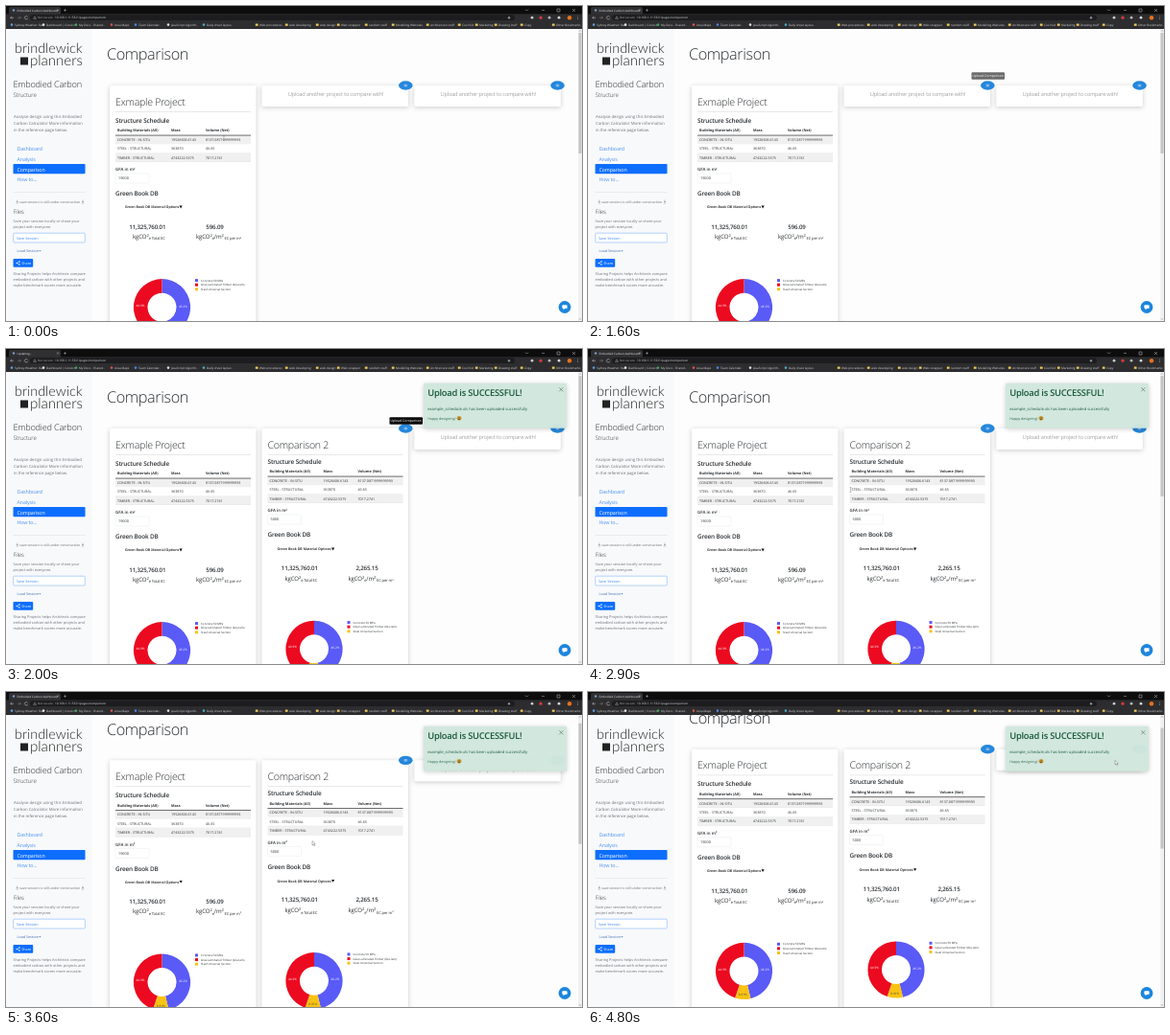
An HTML page for the animation above (4900 ms loop, 600 px wide and 329 px high).

```html
<!DOCTYPE html>
<html lang="en">
<head>
<meta charset="utf-8">
<title>Embodied Carbon dashboard</title>
<style>
  html, body { margin: 0; width: 100%; height: 100%; overflow: hidden; background: #fff; }
  svg { display: block; width: 100vw; height: 100vh; }
  text { font-family: "Open Sans", "Noto Sans", sans-serif; white-space: pre; text-rendering: geometricPrecision; }
  .brand { font-family: Lato, "Open Sans", sans-serif; font-weight: 300; }
  .shadow { filter: drop-shadow(0 1.5px 2.5px rgba(0, 0, 0, .2)); }
</style>
</head>
<body>
<svg id="stage" viewBox="0 0 600 329" preserveAspectRatio="none"></svg>
<script>
const LOOP = 4900, STEP = 100, SCROLL = 23.3;
const BLUE = '#0d6efd', INK = '#2b2f33', GREY = '#6c7075';
const PIE = ['#5a5af6', '#f9c313', '#ec0a20'];

// Markup helpers; text is placed by the middle of its capitals, larger text is set a little tighter.
const text = (x, y, s, size, fill = INK, more = '') =>
  `<text x="${x}" y="${(y + size * .36).toFixed(2)}" font-size="${size}" fill="${fill}" letter-spacing="${size > 5 ? -.025 * size : 0}" ${more}>${s}</text>`;
const rect = (x, y, w, h, fill, more = '') =>
  `<rect x="${x}" y="${y}" width="${w}" height="${h}" fill="${fill}" ${more}/>`;
const dot = (x, y, r, fill) => `<circle cx="${x}" cy="${y}" r="${r}" fill="${fill}"/>`;
const path = (d, stroke, width = .6, fill = 'none') =>
  `<path d="${d}" stroke="${stroke}" stroke-width="${width}" fill="${fill}"/>`;
const group = (id, body) => `<g id="${id}">${body}</g>`;
const lines = (x, y, gap, list, size, fill) =>
  list.map((s, i) => text(x, y + i * gap, s, size, fill)).join('');
const raised = (s, size, shift) =>
  `<tspan dy="${-shift}" font-size="${size}">${s}</tspan><tspan dy="${shift}">\u200b</tspan>`;
const BOLD = 'font-weight="600" ', LIGHT = 'font-weight="300" ', MID = 'text-anchor="middle"';

function donut(cx, cy) {
  const shares = [.462, .089, .449], R = 29.6, r = 15;
  const at = (turn, rad) => {
    const a = turn * 2 * Math.PI;
    return (cx + rad * Math.sin(a)).toFixed(2) + ' ' + (cy - rad * Math.cos(a)).toFixed(2);
  };
  let from = 0, out = '';
  shares.forEach((share, i) => {
    const to = from + share;
    out += `<path fill="${PIE[i]}" d="M${at(from, R)}A${R} ${R} 0 0 1 ${at(to, R)}L${at(to, r)}A${r} ${r} 0 0 0 ${at(from, r)}Z"/>`;
    from = to;
  });
  return out + text(cx + 22, cy - 1.3, '46.2%', 3.2, '#fff', MID)
    + text(cx - 22.5, cy - 2, '44.9%', 3.2, '#fff', MID)
    + text(cx - 1.3, cy + 24.6, '8.91%', 3.1, '#444', MID);
}

function table(x, y) {
  const rows = [
    ['CONCRETE - IN-SITU', '19526606.6143', '8137.0871999999993'],
    ['STEEL - STRUCTURAL', '363870', '46.65'],
    ['TIMBER - STRUCTURAL', '4743222.5375', '7017.2741']
  ];
  const cols = [2, 58, 94], pitch = 9.3;
  const row = (cells, cy, size, more) =>
    cells.map((s, i) => text(x + cols[i], cy, s, size, INK, more)).join('');
  let out = row(['Building Materials (All)', 'Mass', 'Volume (Net)'], y, 3.75, 'font-weight="700"');
  rows.forEach((cells, i) => {
    const top = y + 5 + i * pitch;
    out += rect(x, top, 141, pitch, i % 2 ? '#fff' : '#f0f0f0')
      + rect(x, top + pitch - .2, 141, .3, '#d9dbde') + row(cells, top + 4.6, 3.65);
  });
  return out + rect(x, y + 4.7, 141, .7, '#333');
}

function projectCard(x, title, lift, area, perArea) {
  const left = x + 6, unit = 6.1;
  const legend = ['Concrete 50 MPa', 'Glue Laminated Timber (Glu-lam)', 'Steel Universal Section'];
  const colours = [PIE[0], PIE[2], PIE[1]];
  return rect(x, 83, 152.5, 300, '#fff', 'rx="1.5" class="shadow"')
    + text(left, 99.7, title, 10.6, INK, LIGHT)
    + rect(left, 110, 141, .5, '#cfd1d4')
    + text(left, 119.3 - lift, 'Structure Schedule', 6.45, INK, BOLD)
    + table(left, 130 - lift)
    + text(left, 170.7 - lift, 'GFA in m' + raised('2', 3, 1.5), 4.4, INK, BOLD)
    + rect(left, 175 - lift, 35, 10, '#fff', 'rx="1" stroke="#e6e8ea" stroke-width=".5"')
    + text(left + 3, 180 - lift, area, 3.8)
    + text(left, 196 - lift, 'Green Book DB', 6.4, INK, BOLD)
    + text(left + 10, 210 - lift / 2, 'Green Book DB Material Options', 3.6, '#111', BOLD)
    + `<path d="M${left + 66.5} ${208.6 - lift / 2}h3.2l-1.6 2.8z" fill="#111"/>`
    + text(x + 39.3, 230.8 - lift, '11,325,760.01', 6.15, INK, BOLD + MID)
    + text(x + 109.5, 230.8 - lift, perArea, 6.15, INK, BOLD + MID)
    + text(x + 24, 240.7 - lift / 2, 'kgCO' + raised('2', 4.2, 2) + '<tspan dy="1.4" font-size="4.1">e Total EC</tspan>', unit)
    + text(x + 90, 240.7 - lift / 2, 'kgCO' + raised('2', 4.2, 2) + '<tspan dy="1.4" font-size="4.1">e</tspan><tspan dy="-1.4">/m</tspan>'
      + raised('2', 4.2, 2) + '<tspan dy="1.4" font-size="4.1"> EC per m</tspan>' + raised('2', 2.7, 1.2), unit)
    + donut(x + 54.5, 314.7 - lift * .7)
    + legend.map((s, i) => {
      const y = 286.6 + i * 4.6 - lift / 2;
      return rect(x + 89, y - 1.5, 3, 3, colours[i]) + text(x + 95, y, s, 2.95);
    }).join('');
}

const emptyCard = x => rect(x, 83, 152.5, 22, '#fff', 'rx="1.5" class="shadow"')
  + text(x + 77, 92.3, 'Upload another project to compare with!', 5.75, GREY, LIGHT + MID);

const pill = x => `<ellipse cx="${x}" cy="83" rx="7.3" ry="4.7" fill="#2587dc"/>`
  + `<ellipse cx="${x}" cy="83" rx="1.7" ry="1" fill="none" stroke="#fff" stroke-width=".4"/>` + dot(x, 83, .5, '#fff');

function sidebar() {
  const nav = ['Dashboard', 'Analysis', 'Comparison', 'How to...'];
  const arrow = x => path(`M${x} 202.6v2.4m-1-1l1 1l1-1M${x - 1.2} 206h2.4`, '#777', .45);
  return rect(0, 24, 89.5, 305, '#f8f9fa')
    + `<text x="9" y="49" font-size="14.4" fill="#222" class="brand">brindlewick</text>`
    + `<text x="25" y="62" font-size="15" fill="#222" class="brand">planners</text>`
    + rect(15, 53.5, 8, 8, '#222')
    + text(7.5, 81.3, 'Embodied Carbon', 9.2, INK, LIGHT)
    + text(7.5, 92.7, 'Structure', 6.1, INK, LIGHT)
    + lines(8, 115, 7, ['Analyse design using this Embodied', 'Carbon Calculator More information', 'in the reference page below.'], 4.25, GREY)
    + rect(7.5, 165, 75, 10.3, BLUE, 'rx=".8"')
    + nav.map((s, i) => text(11.5, 149.4 + i * 10.6, s, 5.35, i === 2 ? '#fff' : '#4a92f7')).join('')
    + rect(7.5, 194, 75, .4, '#cfd2d5')
    + arrow(11.7) + text(14, 204.5, 'save session is still under construction', 3.55, GREY) + arrow(80)
    + text(7.5, 215.3, 'Files', 6, INK, LIGHT)
    + lines(7.5, 225, 6, ['Save your session locally or share your', 'project with everyone.'], 3.85, GREY)
    + rect(7.7, 237.2, 74.6, 9.8, '#fff', 'rx="1" stroke="#69a6fb" stroke-width=".5"')
    + text(11, 242.2, 'Save Session', 3.8, '#3b85f0')
    + text(11.5, 255.8, 'Load Session', 3.7, '#3d6db5')
    + `<path d="M34.3 255.2h2.2l-1.1 1.4z" fill="#3d6db5"/>`
    + rect(7.5, 264, 20.7, 8.8, BLUE, 'rx="1"')
    + path('M14 267l-2.6 1.5l2.6 1.5', '#fff', .5) + dot(14, 267, .7, '#fff') + dot(11.2, 268.5, .7, '#fff') + dot(14, 270, .7, '#fff')
    + text(16.3, 268.5, 'Share', 3.7, '#fff')
    + lines(7.5, 280, 6, ['Sharing Projects helps Architects compare', 'embodied carbon with other projects and', 'make benchmark scores more accurate.'], 3.85, GREY);
}

function browser() {
  const marks = [
    [9, 'Sydney Weather: Ra..', '#5b9de0'], [42, 'Dashboard | Convict..', '#e8e8e8'], [76, 'My Docs - Shared..', '#3da35d'],
    [113, 'Area Maps', '#d9534f'], [138, 'Team Calendar..', '#4a86e8'], [172, 'JavaScript Algorith..', '#ddd'], [209, 'Daily sheet layout..', '#48a9c5'],
    [264, 'Web procedures'], [295, 'web developing'], [327, 'web design'], [349, 'Web scrapper'], [378, 'random stuff'],
    [406, 'Modelling Websites'], [442, 'Architecture stuff'], [475, 'Cool Vid'], [493, 'Marketing'], [513, 'Drawing stuff'],
    [540, 'Copy'], [573, 'Other Bookmarks']
  ];
  const pale = '#d4d5d8';
  return rect(0, 0, 600, 9, '#0d0d0e') + rect(3, 1, 54, 8, '#303032', 'rx="1.5"')
    + rect(0, 8.3, 600, 15.7, '#2d2d2f') + rect(25, 9.3, 505, 5.8, '#1d1d1f', 'rx="2.9"')
    + dot(8, 4.4, 1.2, '#7d9fd0')
    + `<text id="tab" x="11.5" y="5.5" font-size="3.1" fill="#e4e5e7"></text>`
    + path('M53 3.4l2 2m0-2l-2 2M60 4.4h3M61.5 2.9v3', pale, .4)
    + path('M541 3.5l1.5 1.5l1.5-1.5M558 4.4h3M574 3h3v3h-3zM590 3l3 3m0-3l-3 3', pale, .45)
    + path('M8 12.2H4.6l1.4-1.4m-1.4 1.4l1.4 1.4', pale, .5) + path('M12 12.2h3.4l-1.4-1.4m1.4 1.4l-1.4 1.4', '#888', .5)
    + path('M22.5 11.3a1.7 1.7 0 1 0 .2 1.5', pale, .5)
    + path('M30 10.8l1.5 2.6h-3z', '#c9cacd', .4)
    + text(33, 12.2, 'Not secure', 3.1, '#aaacb0') + text(51, 12.2, '10.168.1.11:5321/pages/comparison', 3.15, pale)
    + dot(524, 12.2, 1.2, '#8b8d91') + dot(548, 12.2, 1.4, '#c8c9cc') + dot(557, 12.2, 1.6, '#d93b3b')
    + dot(566, 12.2, 1.4, '#b5b7ba') + dot(576, 12.2, 1.4, '#d5d6d8') + dot(587, 12.2, 2.2, '#e8711a')
    + [10.8, 12.2, 13.6].map(y => dot(595.5, y, .4, pale)).join('')
    + marks.map(([x, s, c]) => (c ? dot(x - 3, 19.6, 1.3, c) : rect(x - 4.2, 18.5, 2.8, 2.2, '#f0c95c', 'rx=".3"'))
      + text(x, 19.6, s, 3.1, pale)).join('');
}

const toast = rect(435, 35.8, 149, 47, '#d1e7dd', 'rx="1.2" class="shadow" opacity=".97"')
  + text(439.2, 46, 'Upload is SUCCESSFUL!', 9.35, '#17583a', BOLD)
  + text(439.2, 62.2, 'example_schedule.xls has been uploaded successfully', 4.15, '#1d5f41')
  + text(439.2, 72.5, 'Happy designing!', 3.65, '#2d6b4e')
  + dot(472, 72.3, 2.4, '#c99b3a') + path('M470.6 72.8a1.5 1.5 0 0 0 2.8 0z', 'none', 0, '#5b3a12')
  + dot(471.1, 71.6, .4, '#5b3a12') + dot(472.9, 71.6, .4, '#5b3a12')
  + path('M576.3 40.3l4 4m0-4l-4 4', '#6f8379', .8);

const tip = rect(399.5, 69.2, 34.5, 7.6, '#0b0b0b', 'rx="1"') + text(416.7, 73, 'Upload Comparison', 3.5, '#fff', MID);

document.getElementById('stage').innerHTML =
  rect(0, 0, 600, 329, '#fdfdfd')
  + group('page', text(105, 50.5, 'Comparison', 16.3, INK, LIGHT)
    + projectCard(108, 'Exmaple Project', 0, '19000', '596.09')
    + group('slot', emptyCard(266.5))
    + group('second', projectCard(266.5, 'Comparison 2', 2, '5000', '2,265.15'))
    + emptyCard(425.3) + pill(416.3) + pill(574.5) + group('tip', tip))
  + sidebar()
  + rect(596, 24, 4, 305, '#f1f1f1') + path('M597 26.6l1-1.2l1 1.2M597 326.4l1 1.2l1-1.2', '#777', .5)
  + rect(596.5, 28, 3, 126, '#c4c4c4', 'id="thumb"')
  + dot(582, 314.5, 6.4, '#1c86dd') + rect(579.4, 312.3, 5.2, 3.6, '#fff', 'rx=".9"') + path('M580.6 315.5v2l2-2z', 'none', 0, '#fff')
  + group('toast', toast)
  + browser()
  + group('arrow', path('M0 0v4.4l1.1-1l.8 1.7l.8-.4l-.8-1.6h1.4z', '#555', .4, '#fff'))
  + group('beam', path('M-1-2.4h2M0-2.4v4.8M-1 2.4h2', '#666', .4));

const ids = ['page', 'slot', 'second', 'tip', 'thumb', 'toast', 'tab', 'arrow', 'beam'];
const part = Object.fromEntries(ids.map(id => [id, document.getElementById(id)]));
const show = (node, opacity) => node.setAttribute('opacity', +opacity);
const move = (node, x, y) => node.setAttribute('transform', `translate(${x.toFixed(2)} ${y.toFixed(2)})`);

// Pointer stops: time, x, y
const stops = [
  [0, 227, 138], [900, 227, 138], [1000, 238, 138], [1400, 238, 138], [1600, 418, 84], [2500, 418, 84],
  [2900, 273.5, 147], [3000, 273.5, 147], [3500, 319, 155.5], [3900, 319, 156], [4700, 549, 71.5], [4900, 549, 71.5]
];
function pointer(t) {
  const i = Math.max(1, stops.findIndex(s => s[0] >= t));
  const [a, b] = [stops[i - 1], stops[i]];
  const k = (t - a[0]) / (b[0] - a[0]), ease = k * k * (3 - 2 * k);
  return [a[1] + (b[1] - a[1]) * ease, a[2] + (b[2] - a[2]) * ease];
}

function draw(ms) {
  const t = Math.floor(ms % LOOP / STEP) * STEP;
  const uploaded = t >= 1900;
  const scroll = t < 3600 ? 0 : t < 3700 ? SCROLL / 2 : SCROLL;
  move(part.page, 0, -scroll);
  move(part.thumb, 0, scroll * .41);
  show(part.slot, !uploaded);
  show(part.second, uploaded);
  show(part.toast, !uploaded ? 0 : t < 2000 ? .6 : 1);
  show(part.tip, t < 1600 || t > 2600 ? 0 : t === 1600 ? .6 : t === 2600 ? .4 : 1);
  move(part.tip, 0, uploaded ? 2 : 0);
  part.tab.textContent = t >= 1800 && t < 2200 ? 'Updating...' : 'Embodied Carbon dashboard';

  const [x, y] = pointer(t);
  const overText = t < 1500 || (t >= 2900 && t <= 3000);
  const overButton = t >= 1600 && t <= 2500;
  move(part.arrow, x, y);
  move(part.beam, x, y);
  show(part.beam, overText);
  show(part.arrow, !overText && !overButton);
}

const start = performance.now();
function tick() {
  draw(performance.now() - start);
  requestAnimationFrame(tick);
}
tick();
</script>
</body>
</html>
```
